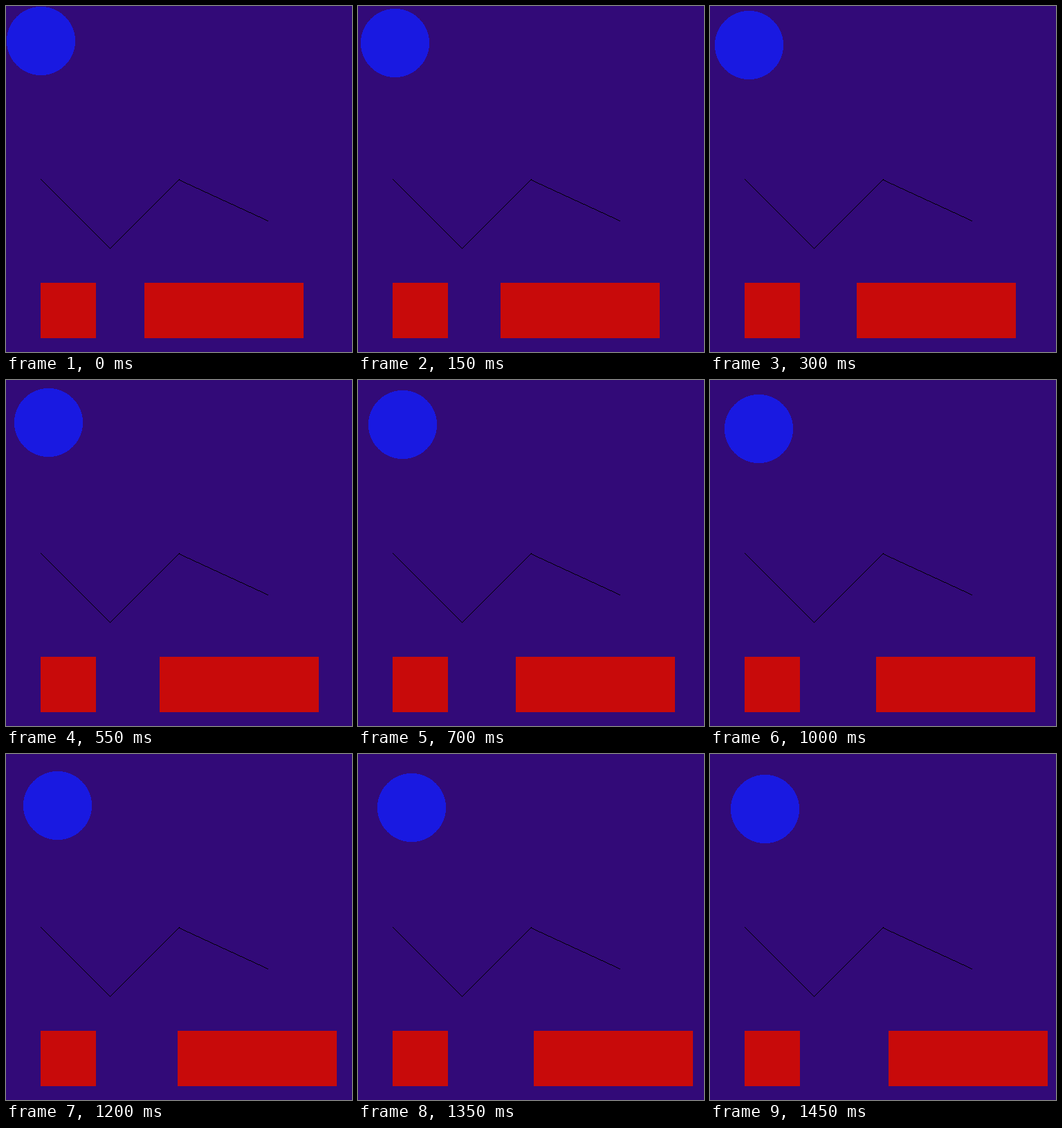
These frames come from a looping animation (500x500 px, 1.5 s). An HTML page with a canvas:

```html
<!DOCTYPE html>
<html>
<head>
<meta charset="utf-8">
<style>
  html, body { margin: 0; width: 100%; height: 100%; overflow: hidden; background: #320a78; }
  canvas { display: block; }
</style>
</head>
<body>
<canvas id="stage" width="500" height="500"></canvas>
<script>
const ctx = document.getElementById('stage').getContext('2d');

function rect(x, y, w, h, color) {
  ctx.fillStyle = color;
  ctx.fillRect(x, y, w, h);
}

// Hard-edged one-pixel line
function line(x1, y1, x2, y2) {
  const count = Math.max(Math.abs(x2 - x1), Math.abs(y2 - y1));
  for (let i = 0; i <= count; i++) {
    const k = i / count;
    rect(Math.round(x1 + (x2 - x1) * k), Math.round(y1 + (y2 - y1) * k), 1, 1, '#000');
  }
}

// Hard-edged disc, one row at a time
function disc(cx, cy, r, color) {
  for (let y = Math.ceil(cy - r); y < cy + r; y++) {
    const dy = y + 0.5 - cy;
    const half = Math.sqrt(Math.max(0, r * r - dy * dy));
    const left = Math.round(cx - half);
    rect(left, y, Math.round(cx + half) - left, 1, color);
  }
}

function draw() {
  const step = Math.floor(performance.now() % 1500 / 50);
  rect(0, 0, 500, 500, '#320a78');
  disc(50.5 + step, 50.5 + step, 49.5, '#1919e1');
  line(50, 250, 150, 350);
  line(150, 350, 250, 250);
  line(250, 251, 378, 310);
  rect(50, 400, 80, 80, '#c80a0a');
  rect(200 + 2 * step, 400, 230, 80, '#c80a0a');
  requestAnimationFrame(draw);
}
draw();
</script>
</body>
</html>
```
